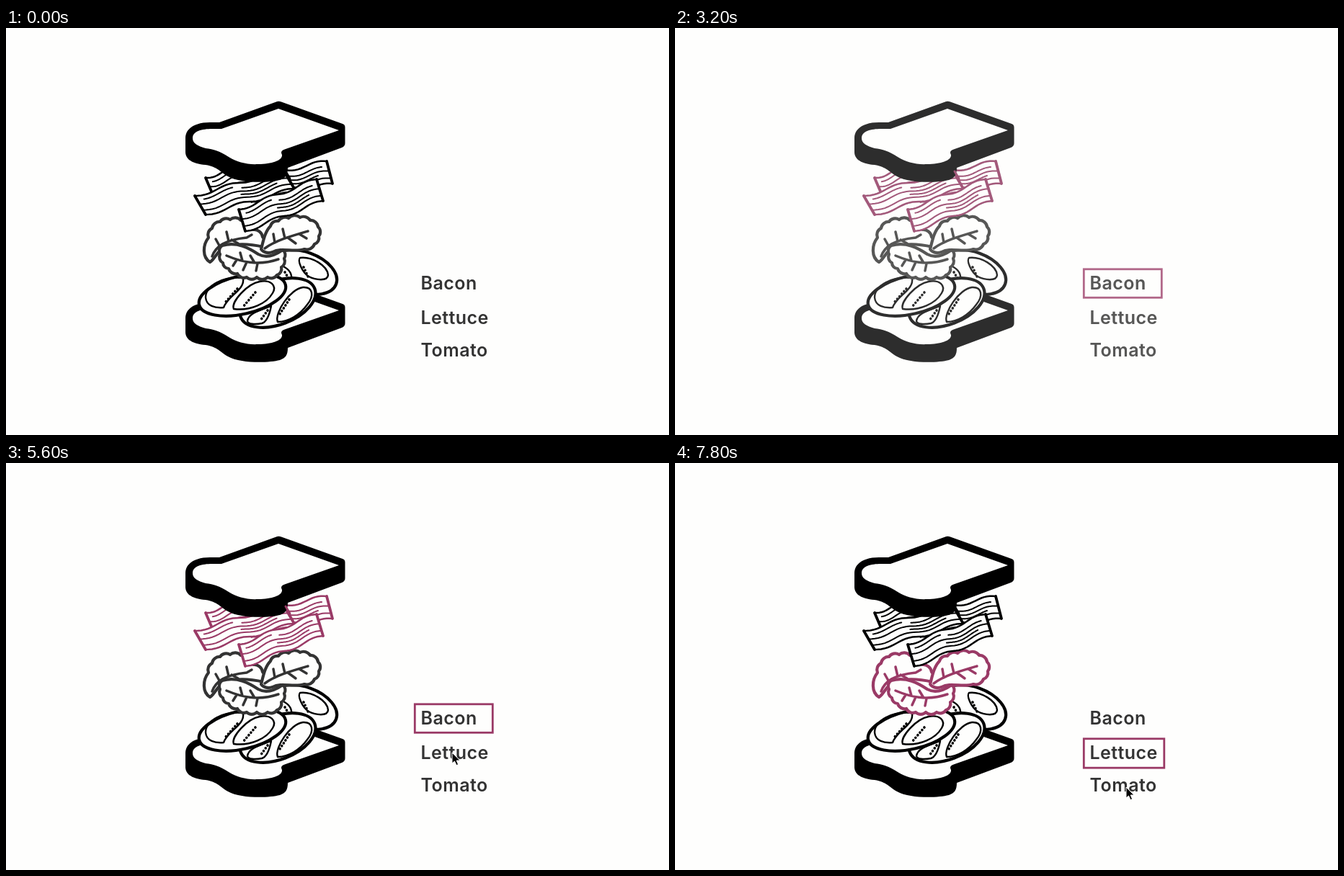
Animation, 920 px wide and 565 px high, one loop 8000 ms. Source, as an HTML page:

```html
<!DOCTYPE html>
<html lang="en">
<head>
<meta charset="utf-8">
<title>Sandwich layers</title>
<style>
  html, body { margin: 0; width: 100%; height: 100%; overflow: hidden; background: #fefefd; }
  svg { display: block; width: 100%; height: 100%; }
  text { font: 600 25px Inter, "Open Sans", sans-serif; letter-spacing: .45px; fill: #333; }
  .line { fill: none; stroke: currentColor; stroke-linecap: round; stroke-linejoin: round; }
  .solid { fill: #fefefd; stroke: currentColor; stroke-linejoin: round; }
</style>
</head>
<body>
<svg id="stage" viewBox="0 0 920 565"></svg>
<script>
const ACCENT = '#9a3a66';
const LOOP = 8000, STEP = 200, FADE = 450;
const stage = document.getElementById('stage');

const line = (d, width) => `<path class="line" stroke-width="${width}" d="${d}"/>`;
const solid = (d, width) => `<path class="solid" stroke-width="${width}" d="${d}"/>`;

function bread(dy) {
  return `<g transform="translate(0 ${dy})">
    <path fill="#000" d="M249 153C249 139 263 131 283 131L296 131L375 102.5Q378 101 382 102.5L467 133
      Q470.5 134 470.5 138V160Q470.5 164 466 166L391 194C391 204 388 208 380 211C364 215 326 216 308 206
      C296 199 294 193 277 190C262 189 249 184 249 172Z"/>
    <path fill="#fefefd" d="M259 153C259 143 272 140 286 140H299L378 112L462 142L388 168
      C382 170 381 172 383 176C384 184 368 189 350 189C335 190 320 186 309 179
      C297 171 288 168 277 167C266 164 259 160 259 153Z"/></g>`;
}

// A strip is spanned by (ax, ay) along its length and (bx, by) across.
function strip(x, y, ax, ay, bx, by) {
  const wave = (across, from, to) => {
    const points = [];
    for (let i = 0; i <= 28; i++) {
      const u = from + (to - from) * i / 28;
      const sway = 2.5 * Math.sin(u * Math.PI * 4);
      points.push(`${(x + ax * u + bx * across).toFixed(1)} ${(y + ay * u + by * across + sway).toFixed(1)}`);
    }
    return points;
  };
  const top = wave(0, 0, 1), bottom = wave(1, 0, 1);
  const grain = [[.2, .08, .4], [.26, .5, .92], [.44, 0, 1], [.6, .45, .85], [.76, 0, 1]];
  return solid(`M${top.join('L')}L${bottom.reverse().join('L')}Z`, 2.5)
    + grain.map(g => line('M' + wave(...g).join('L'), 2)).join('')
    + line(`M${x} ${y}l${bx} ${by}M${x + ax} ${y + ay}l${bx} ${by}`, 3.8);
}

function bacon(color) {
  return `<g color="${color}">${strip(277, 208, 92, -31, 12, 28)}${strip(333, 210, 112, -25, 8, 31)}
    ${strip(262, 233, 123, -36, 15, 26)}${strip(323, 252, 108, -42, 9, 30)}</g>`;
}

// Outward bumps between neighbouring points, going clockwise.
function scallops(points) {
  return points.slice(1).map(([x, y], i) => {
    const r = Math.hypot(x - points[i][0], y - points[i][1]) * .72;
    return `A${r.toFixed(1)} ${r.toFixed(1)} 0 0 1 ${x} ${y}`;
  }).join('');
}

function leaf(start, bumps, end, veins) {
  return solid(start + scallops(bumps) + end + 'Z', 4.2) + line(veins, 3.5);
}

function lettuce(color) {
  const left = leaf('M283 325C272 318 273 301 281 291',
    [[281, 291], [286, 278], [297, 269], [311, 266], [326, 267], [343, 280], [356, 290], [358, 304]],
    'C340 300 318 298 303 305C293 309 289 322 283 325',
    'M286 317C291 303 304 294 334 291M296 302L291 293M309 296L306 283M313 294L322 299M334 291L341 287');
  const right = leaf('M354 307C357 296 359 283 367 275',
    [[367, 275], [378, 268], [392, 264], [408, 263], [422, 267], [433, 276], [434, 289], [428, 300], [414, 307]],
    'C400 312 382 304 370 311C364 313 357 312 354 307',
    'M359 306C374 295 395 289 419 282M373 298L371 286M387 292L384 279M391 291L402 299M407 286L417 292');
  const front = leaf('M300 302C321 296 338 306 350 314C361 320 374 315 384 308',
    [[384, 308], [386, 320], [382, 332], [376, 343], [363, 346], [348, 346], [334, 346], [321, 341], [309, 334], [301, 326], [297, 314], [300, 302]],
    '', 'M306 316C325 324 349 331 378 321M320 322L315 330M334 325L329 336M349 327L347 337M328 323L325 312M345 326L339 316');
  return `<g color="${color}">${left}${right}${front}</g>`;
}

function tomato(cx, cy, rx, ry, angle, segments, seeds) {
  return `<ellipse class="solid" stroke-width="4.2" cx="${cx}" cy="${cy}" rx="${rx}" ry="${ry}"
      transform="rotate(${angle} ${cx} ${cy})"/>${line(segments, 2.4)}
    <path class="line" stroke-width="3.6" stroke-dasharray=".1 4.6" d="${seeds}"/>`;
}

const tomatoes = `<g color="#000">
  ${tomato(413, 339, 48, 28, 20,
    'M408 319C425 317 446 330 447 343C446 352 430 350 420 345C411 339 404 323 408 319M385 331Q398 338 396 350',
    'M413 332L420 347M387 339L393 349')}
  ${tomato(377, 381.5, 55, 30, -21,
    'M377 408C372 395 395 362 412 360C426 359 428 372 418 384C408 398 392 408 377 408ZM335 407C336 396 352 392 368 386C366 396 362 408 355 410C345 412 336 411 335 407Z',
    'M393 377L380 397M363 392L353 406')}
  ${tomato(328, 370.5, 61.5, 26.5, -13,
    'M329 347C301 344 277 358 277 374C278 386 290 389 302 388C308 371 332 364 329 347ZM316 390C312 380 335 355 352 352C368 349 376 358 370 368C362 382 340 393 316 390Z',
    'M321 362L305 380M346 367L329 387')}
</g>`;

const frame = (y, width, height) =>
  `<rect x="567.3" y="${y}" width="${width}" height="${height}" fill="none" stroke="${ACCENT}" stroke-width="2.8"/>`;

function scene(active) {
  const box = { Bacon: frame(334.8, 108, 39.5), Lettuce: frame(382.8, 111.5, 40.4) }[active] || '';
  const baconColor = active === 'Bacon' ? ACCENT : '#000';
  return `<g class="scene">${bread(250)}${tomatoes}
    ${lettuce(active === 'Lettuce' ? ACCENT : '#333')}${bacon(baconColor)}${bread(0)}
    <g color="${baconColor}">${line('M388 199L394 209', 3)}</g>
    <text x="575.5" y="362.5">Bacon</text><text x="575.5" y="410.5">Lettuce</text>
    <text x="575.5" y="455.5">Tomato</text>${box}</g>`;
}

stage.innerHTML = scene('') + scene('Bacon') + scene('Lettuce')
  + `<path id="cursor" fill="#000" stroke="#fff" stroke-width="1" d="M0 0V15L3.5 12L6 17.6L8.6 16.5L6.2 11H11Z"/>`;
const scenes = [...document.querySelectorAll('.scene')];
const cursor = document.getElementById('cursor');

const fadeStarts = [2856, 5622];
const moves = [
  { start: 800, arrive: 1700, end: 2850, from: [681, 437], to: [609, 359] },
  { start: 4000, arrive: 4800, end: 5700, from: [609, 359], to: [619, 402] },
  { start: 6800, arrive: 7600, end: LOOP, from: [619, 402], to: [626, 450] }
];
const clamp = v => Math.min(1, Math.max(0, v));
const ease = v => v * v * (3 - 2 * v);

function draw(now) {
  const t = Math.floor(now % LOOP / STEP) * STEP;
  const [toBacon, toLettuce] = fadeStarts.map(start => clamp((t - start) / FADE));
  [1 - toBacon, toBacon * (1 - toLettuce), toLettuce].forEach((opacity, i) => {
    scenes[i].style.opacity = opacity;
    scenes[i].style.display = opacity ? '' : 'none';
  });

  const move = moves.find(m => t >= m.start && t < m.end);
  cursor.style.display = move ? '' : 'none';
  if (move) {
    const p = ease(clamp((t - move.start) / (move.arrive - move.start)));
    const [x, y] = move.from.map((v, i) => v + (move.to[i] - v) * p);
    cursor.setAttribute('transform', `translate(${x} ${y})`);
  }
}

const began = performance.now();
function tick() {
  draw(performance.now() - began);
  requestAnimationFrame(tick);
}
tick();
</script>
</body>
</html>
```
